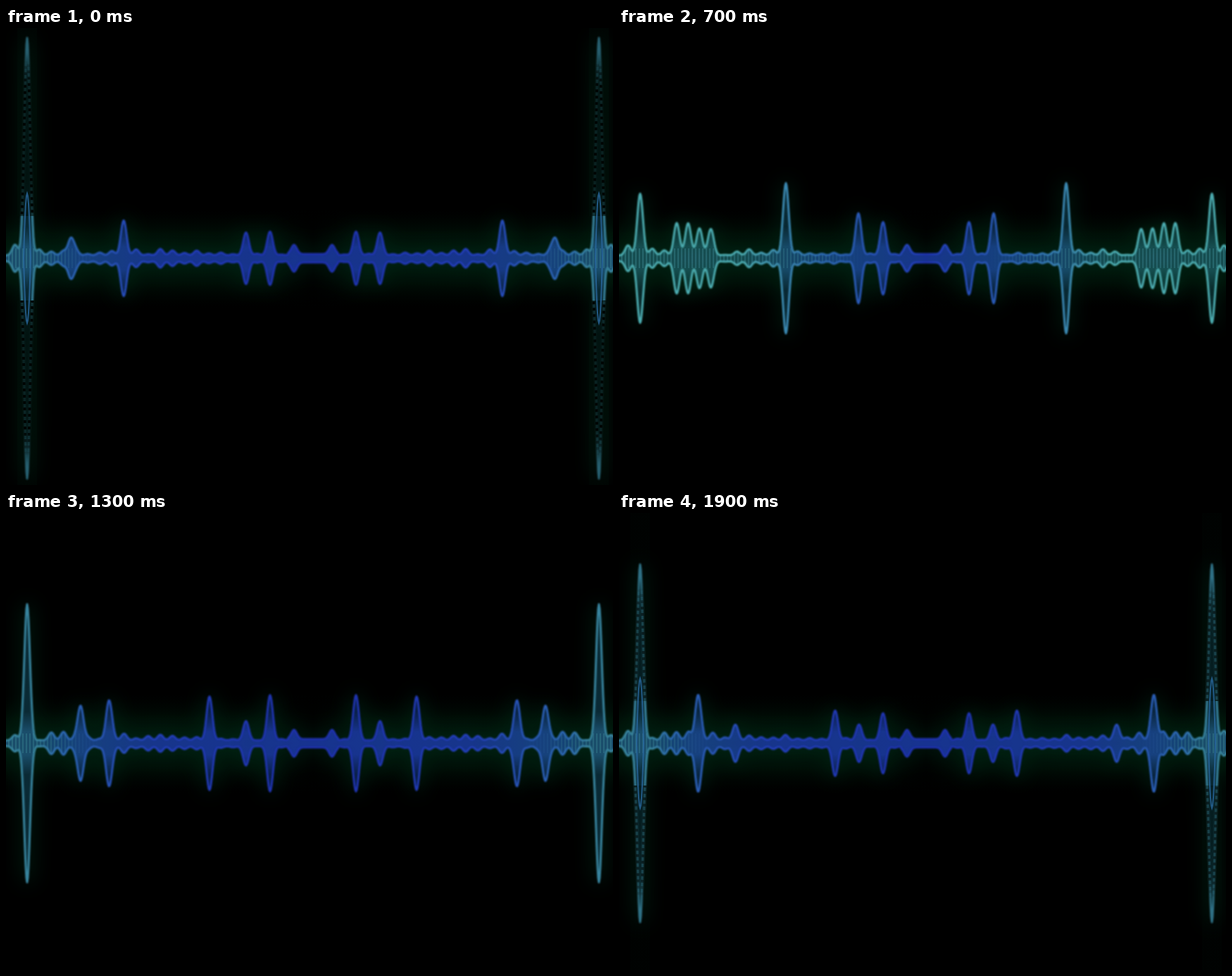
Write an HTML page with a canvas that moves like this. It is 862 by 649 pixels and loops after 2000 ms.

```html
<!DOCTYPE html>
<html lang="en">
<head>
<meta charset="utf-8">
<title>Sound wave</title>
<style>
  html, body { margin: 0; width: 100%; height: 100%; overflow: hidden; background: #000; }
  canvas { display: block; }
</style>
</head>
<body>
<canvas id="stage" width="862" height="649"></canvas>
<script>
const ctx = document.getElementById('stage').getContext('2d');
const W = 862, H = 649, CX = 436, CY = 327;
const STEP = 100, STEPS = 20;
const EDGE_X = 30, GRID = 17.2;

// Height of the spike at the edge, as [step, height].
const EDGE = [[0, 312], [5, 97], [9, 75], [11, 234], [13, 188], [15, 95], [17, 307], [19, 246]];

// Main beats of the left half, as [x, height]; they cross-fade from one step to the next.
const BEATS = [
  { step: 0, peaks: [[92, 27], [167, 43], [341, 33]] },
  { step: 5, peaks: [[47, 36], [165, 27], [236, 35], [305, 37]] },
  { step: 7, peaks: [[82, 46], [98, 40], [114, 37], [130, 37], [237, 102], [340, 62]] },
  { step: 9, peaks: [[76, 52], [129, 102], [166, 100], [238, 72], [341, 58]] },
  { step: 13, peaks: [[106, 52], [146, 56], [289, 64], [341, 28]] },
  { step: 15, peaks: [[92, 63], [134, 52], [165, 38], [237, 68]] },
  { step: 19, peaks: [[112, 62], [165, 24], [307, 45], [341, 24]] }
];

const clamp = v => Math.max(0, Math.min(1, v));
const mix = (a, b, t) => a + (b - a) * t;
const random = n => { const s = Math.sin(n * 12.9898) * 43758.5453; return s - Math.floor(s); };
const rgb = (a, b, t) => `rgb(${a.map((v, i) => Math.round(mix(v, b[i], t)))})`;

// Neighbouring keys around a step and the progress between them.
function between(keys, stepOf, step) {
  const i = keys.findLastIndex(k => stepOf(k) <= step);
  const a = keys[i], b = keys[i + 1] || a;
  return [a, b, a === b ? 0 : (step - stepOf(a)) / (stepOf(b) - stepOf(a))];
}

function poseAt(step) {
  const [e0, e1, et] = between(EDGE, k => k[0], step);
  const [b0, b1, bt] = between(BEATS, k => k.step, step);
  const spike = mix(e0[1], e1[1], et);
  const teal = Math.exp(-(((step - 7) / 2.2) ** 2));
  const peaks = [
    [EDGE_X, spike],
    [375, 50 - 18 * Math.cos((step - 2) / STEPS * 2 * Math.PI)],
    [409, 19],
    ...b0.peaks.map(([x, h]) => [x, h * (1 - bt)]),
    ...b1.peaks.map(([x, h]) => [x, h * bt])
  ];
  // Small random murmurs, livelier towards the edge.
  for (let x = EDGE_X - GRID, k = 1; x < 400; x += GRID, k++)
    peaks.push([x, 4 + 17 * (1 - x / 480) * random(step * 31 + k)]);
  return { spike, teal, peaks, reach: 75 + 215 * teal };
}

function heightAt(x, { peaks }) {
  const m = x > CX ? 2 * CX - x : x;
  const base = m > 400 ? 6 : 4;
  return peaks.reduce((sum, [p, h]) =>
    sum + Math.max(0, h - base) * Math.exp(-(((m - p) / 5.7) ** 2)), base);
}

// Closed shape, symmetric about the axis, from a half-height function.
function lens(from, to, half) {
  const path = new Path2D();
  for (let x = from; x <= to; x++) path.lineTo(x, CY - half(x));
  for (let x = to; x >= from; x--) path.lineTo(x, CY + half(x));
  path.closePath();
  return path;
}

function horizontal(stops) {
  const g = ctx.createLinearGradient(0, 0, 2 * CX, 0);
  for (const [x, color] of stops) {
    const p = clamp(x / CX) / 2;
    g.addColorStop(p, color);
    g.addColorStop(1 - p, color);
  }
  return g;
}

function vertical(reach, stops) {
  const g = ctx.createLinearGradient(0, CY - reach, 0, CY + reach);
  for (const [d, color] of stops) {
    g.addColorStop(0.5 - d / 2, color);
    g.addColorStop(0.5 + d / 2, color);
  }
  return g;
}

function drawHaze() {
  ctx.fillStyle = vertical(70, [[0, 'rgba(0,30,16,.8)'], [0.5, 'rgba(0,20,9,.7)'], [1, 'rgba(0,8,3,0)']]);
  ctx.fillRect(0, CY - 70, W, 140);
  ctx.fillStyle = horizontal([[360, 'rgba(0,0,0,0)'], [436, 'rgba(0,0,0,.9)']]);
  ctx.fillRect(0, CY - 70, W, 140);
}

function drawBody(path, { reach, teal }) {
  const edge = rgb([30, 78, 118], [26, 78, 88], teal);
  ctx.save();
  ctx.clip(path);
  ctx.fillStyle = horizontal([
    [0, edge], [reach * 0.6, edge], [reach, 'rgb(26,68,135)'],
    [reach + 140, 'rgb(28,48,160)'], [436, 'rgb(28,46,165)']
  ]);
  ctx.fillRect(0, 0, W, H);
  ctx.fillStyle = horizontal([[0, 'rgba(75,155,170,.4)'], [reach, 'rgba(70,140,170,.3)'], [reach + 60, 'rgba(40,80,190,0)']]);
  for (let x = 3; x < W; x += 5) ctx.fillRect(x, CY - 14, 2, 28);
  ctx.fillStyle = vertical(320, [[0, 'rgba(0,8,12,0)'], [0.05, 'rgba(0,8,12,0)'], [0.14, 'rgba(0,8,12,.6)'], [1, 'rgba(0,8,12,.7)']]);
  ctx.fillRect(0, 0, W, H);
  ctx.restore();
}

function strokeWave(path, { reach, teal }) {
  const edge = rgb([56, 132, 158], [76, 172, 176], teal);
  ctx.save();
  ctx.lineJoin = 'round';
  ctx.lineWidth = 3;
  ctx.strokeStyle = horizontal([
    [0, edge], [reach * 0.6, edge], [reach, 'rgb(44,104,176)'],
    [reach + 130, 'rgb(34,62,182)'], [436, 'rgb(29,47,168)']
  ]);
  ctx.shadowColor = 'rgb(0,75,42)';
  ctx.shadowBlur = 28;
  ctx.filter = 'blur(0.9px)';
  ctx.stroke(path);
  ctx.restore();
}

// Very tall edge spikes break up into dim dots and keep a shorter spindle inside.
function fadeSpikes(path, spike) {
  const dim = clamp((spike - 190) / 100);
  if (!dim) return;
  for (const x of [EDGE_X, 2 * CX - EDGE_X]) {
    ctx.save();
    ctx.beginPath();
    ctx.rect(x - 14, 0, 28, CY - 60);
    ctx.rect(x - 14, CY + 60, 28, H);
    ctx.clip();
    ctx.fillStyle = vertical(spike, [
      [0.2, `rgba(0,14,8,${0.6 * dim})`], [0.35, `rgba(0,14,8,${0.8 * dim})`],
      [0.78, `rgba(0,14,8,${0.75 * dim})`], [0.95, `rgba(0,14,8,${0.3 * dim})`]
    ]);
    ctx.fillRect(x - 14, 0, 28, H);
    ctx.strokeStyle = vertical(spike, [[0.78, `rgba(0,5,3,${dim})`], [0.9, 'rgba(0,5,3,0)']]);
    ctx.lineWidth = 4;
    ctx.setLineDash([4, 5]);
    ctx.stroke(path);
    ctx.restore();

    ctx.strokeStyle = 'rgba(42,105,160,.8)';
    ctx.lineWidth = 2;
    ctx.stroke(lens(x - 5, x + 5, u => 92 * (1 - ((u - x) / 5) ** 2)));
  }
}

function draw(step) {
  const pose = poseAt(step);
  const path = lens(-4, W + 4, x => heightAt(x, pose));
  ctx.fillStyle = '#000';
  ctx.fillRect(0, 0, W, H);
  drawHaze();
  drawBody(path, pose);
  strokeWave(path, pose);
  fadeSpikes(path, pose.spike);
}

const start = performance.now();
let shown = -1;
function tick() {
  const step = Math.floor((performance.now() - start) / STEP) % STEPS;
  if (step !== shown) draw(shown = step);
  requestAnimationFrame(tick);
}
tick();
</script>
</body>
</html>
```
